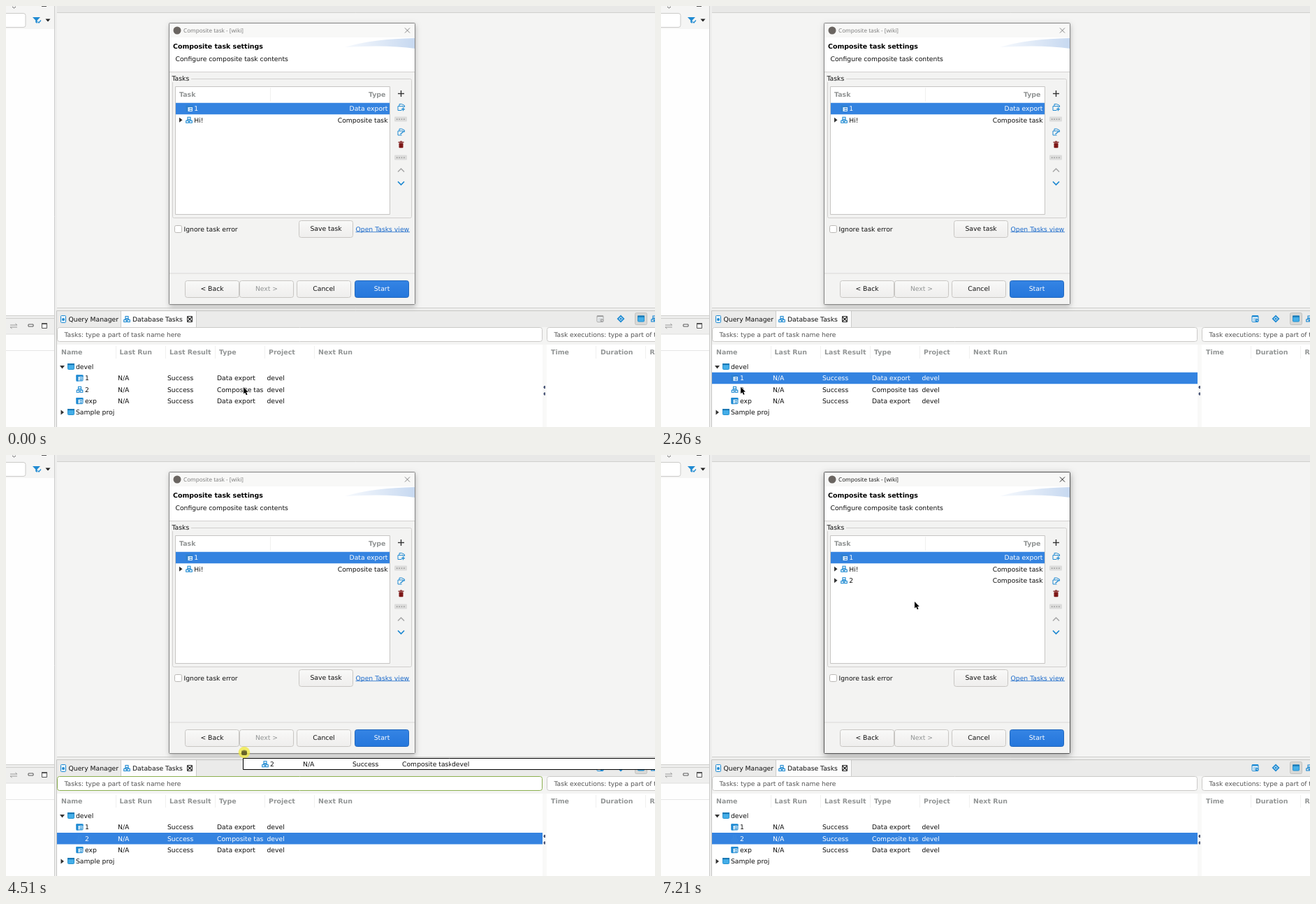
Animation, 929 px wide and 603 px high, one loop 8930 ms. Source, as an HTML page with a canvas:

```html
<!DOCTYPE html>
<html lang="en">
<head>
<meta charset="utf-8">
<title>Composite task settings</title>
<style>
html, body { margin: 0; width: 100%; height: 100%; overflow: hidden; background: #f4f4f3; }
canvas { display: block; }
</style>
</head>
<body>
<canvas id="stage" width="929" height="603"></canvas>
<script>
const c = document.getElementById('stage').getContext('2d');
const LOOP = 8930, STEP = 45;
const BLUE = '#1f8ad2', SEL = '#3483e0', GREY = '#929595', INK = '#111';
const UI = '"DejaVu Sans", sans-serif';

// Pointer path: time, x, y
const path = [
  [0, 340, 546], [30, 340, 546], [200, 290, 562], [400, 190, 572], [600, 120, 545],
  [710, 108, 531], [990, 108, 531], [1140, 110, 531], [1320, 110, 531], [1500, 146, 528],
  [1720, 146, 528], [1765, 142, 528], [2050, 122, 530], [2250, 114, 545], [2450, 116, 558],
  [2670, 127, 554], [2930, 116, 547], [4000, 116, 547], [4100, 172, 533], [4150, 176, 532],
  [4250, 235, 515], [4400, 318, 462], [4510, 341, 426], [4650, 340, 365], [4840, 316, 264],
  [4880, 314, 262], [5030, 303, 211], [6650, 303, 211], [7210, 363, 210], [LOOP, 363, 210]
];

const within = (t, a, b) => t >= a && t < b;

const stepped = t => Math.floor((t - 10) / STEP) * STEP + 10;

function pointerAt(t) {
  const i = Math.max(1, path.findIndex(p => p[0] > t));
  const [t0, x0, y0] = path[i - 1], [t1, x1, y1] = path[i];
  const k = (t - t0) / (t1 - t0);
  return [x0 + (x1 - x0) * k, y0 + (y1 - y0) * k];
}

function box(x, y, w, h, fill, stroke, r = 0) {
  c.beginPath();
  c.roundRect(x, y, w, h, r);
  if (fill) { c.fillStyle = fill; c.fill(); }
  if (stroke) { c.strokeStyle = stroke; c.lineWidth = 1; c.stroke(); }
}

function line(points, color, width = 1) {
  c.beginPath();
  points.forEach(([x, y]) => c.lineTo(x, y));
  c.strokeStyle = color;
  c.lineWidth = width;
  c.stroke();
}

function poly(points, fill) {
  c.beginPath();
  points.forEach(([x, y]) => c.lineTo(x, y));
  c.closePath();
  c.fillStyle = fill;
  c.fill();
}

function circle(x, y, r, fill) {
  c.beginPath();
  c.arc(x, y, r, 0, Math.PI * 2);
  c.fillStyle = fill;
  c.fill();
}

// y is the middle of the capitals
function text(s, x, y, color = INK, align = 'left', font = '9.25px ' + UI) {
  c.font = font;
  c.textAlign = align;
  c.fillStyle = color;
  c.fillText(s, x, y + 3.4);
}

const bold = (s, x, y, color = GREY, align = 'left') =>
  text(s, x, y, color, align, 'bold 9.45px ' + UI);

function clipped(s, x, y, w, color) {
  c.save();
  c.beginPath();
  c.rect(x - 1, y - 8, w + 1, 16);
  c.clip();
  text(s, x, y, color);
  c.restore();
}

// Icons, centred on x, y
function exportIcon(x, y, selected) {
  const col = selected ? '#2f80cf' : BLUE;
  box(x - 4.5, y - 4, 9, 8, selected ? '#e4f1fc' : '#e6f3fb', selected ? null : col, 1);
  box(x - 5, y - 4.5, 10, 2.5, col);
  box(x - 5, y - 4.5, 3, 9, col);
  box(x, y - .8, 3.5, 1.2, col);
  box(x, y + 1.8, 3.5, 1.2, col);
}

function groupIcon(x, y, color = BLUE) {
  c.strokeStyle = color;
  c.lineWidth = 1.1;
  c.strokeRect(x - 2, y - 4, 4, 3);
  c.strokeRect(x - 4.3, y + 1, 3.6, 3);
  c.strokeRect(x + .7, y + 1, 3.6, 3);
  line([[x - 2.7, y + 1], [x - 2.7, y - .5], [x + 2.7, y - .5], [x + 2.7, y + 1]], color);
}

function windowIcon(x, y) {
  box(x - 4.5, y - 4, 9, 8, '#45aee8', '#2391d0', 1);
  box(x - 5, y - 4.5, 10, 2.2, '#1878b4');
}

function editIcon(x, y, plus) {
  line([[x + 1, y + 4.5], [x - 4.5, y + 4.5], [x - 4.5, y - 1.5], [x + 3.5, y - 1.5], [x + 3.5, y]], BLUE);
  line([[x - 2.5, y - 1.5], [x - 2.5, y - 4.5], [x + 1, y - 4.5], [x + 5, y - 2.5], [x + 5, y]], BLUE);
  if (plus) {
    line([[x + .5, y + 2.8], [x + 5.5, y + 2.8]], BLUE, 1.3);
    line([[x + 3, y + .3], [x + 3, y + 5.3]], BLUE, 1.3);
  } else line([[x - 1, y + 3], [x + 4, y - 1]], BLUE, 1.5);
}

function clockIcon(x, y, color) {
  box(x - 4.5, y - 4.5, 9, 9, '#f6fafc', color, 1);
  box(x - 4.5, y - 4.5, 9, 2, color);
  line([[x - 3, y], [x + 3, y]], color, .8);
  line([[x - 3, y + 2.2], [x, y + 2.2]], color, .8);
  circle(x + 2.5, y + 2.5, 2.4, color);
  line([[x + 2.5, y + 1], [x + 2.5, y + 2.8], [x + 4, y + 2.8]], '#fff', .7);
}

function pill(y) {
  box(556, y - 3.5, 18, 7, '#dcdcdb', null, 1);
  for (let i = 0; i < 4; i++) box(559 + i * 3.4, y - .5, 1.4, 1.4, '#929292');
}

const right = (x, y) => poly([[x - 2, y - 3.5], [x + 2.5, y], [x - 2, y + 3.5]], '#333');
const down = (x, y) => poly([[x - 3.5, y - 2], [x + 3.5, y - 2], [x, y + 2.5]], '#333');

function leftSide() {
  box(0, 0, 70, 443, '#f5f5f4');
  box(0, 33, 70, 410, '#fefefe');
  box(-5, 10.5, 33, 20, '#fff', '#cbcac8', 3);
  line([[9, 1], [11.5, 3], [14, 1]], '#666');
  line([[51, .5], [58, .5]], '#555');
  poly([[38, 16], [49, 16], [44.7, 20.5], [44.7, 25], [42.3, 23.5], [42.3, 20.5]], BLUE);
  line([[45.5, 22.5], [47, 24], [50, 20.5]], BLUE, 1.2);
  poly([[56.5, 18.5], [63.5, 18.5], [60, 22.5]], '#222');
  line([[0, 443.5], [70, 443.5]], '#cfcfcd');
  box(0, 444, 70, 4, '#eeeeed');
  box(0, 447, 70, 156, '#fefefe');
  box(0, 447, 70, 23, '#efefee');
  line([[0, 447.5], [70, 447.5]], '#cfcfcd');
  line([[0, 470], [70, 470]], '#dededc');
  line([[0, 493.5], [70, 493.5]], '#e6e6e5');
  line([[6, 457], [16, 457], [13.5, 455]], '#9a9a9a');
  line([[16, 460], [6, 460], [8.5, 462]], '#9a9a9a');
  box(32, 456, 7, 3, '#fff', '#555');
  box(51.5, 454.5, 7, 7, '#fff', '#555');
  box(51, 454, 8, 2, '#555');
  line([[69.5, 0], [69.5, 603]], '#cccccb');
  box(70, 0, 3, 603, '#eeeeed');
}

function tableRow(y, name, type, icon, selected) {
  if (selected) box(73, y - 8.2, 695, 16.4, SEL);
  const col = selected ? '#fff' : INK;
  if (icon === 'group') groupIcon(105.5, y, selected ? '#3a88e0' : BLUE);
  else exportIcon(105.5, y, selected);
  text(name, 113, y, col);
  text('N/A', 160, y, col);
  text('Success', 231, y, col);
  clipped(type, 302, y, 67, col);
  text('devel', 373.5, y, col);
}

function bottomPanel(t) {
  const live = t >= 1320;
  box(73, 437, 856, 166, '#fff');
  box(73, 437, 856, 23, '#ebebea');
  line([[929, 436.5], [72.5, 436.5], [72.5, 603]], '#c6c6c4');
  box(165, 437, 107, 24, '#fcfcfc');
  line([[164.5, 437], [164.5, 460]], '#cdcdcb');
  line([[272.5, 437], [272.5, 460]], '#cdcdcb');
  box(78.5, 443.5, 7, 10, '#e9f5fb', BLUE, 1);
  circle(82, 449, 2, BLUE);
  text('Query Manager', 89.5, 448.5);
  groupIcon(173, 448.5);
  text('Database Tasks', 181, 448.5);
  box(259.5, 444.5, 7, 8, '#fff', '#333');
  line([[260, 445.5], [266, 451.5]], '#222', 1.3);
  line([[266, 445.5], [260, 451.5]], '#222', 1.3);

  clockIcon(850.5, 448, live ? BLUE : '#a4a4a4');
  poly([[880, 442.5], [885.5, 448], [880, 453.5], [874.5, 448]], BLUE);
  poly([[880, 445], [883, 448], [880, 451], [877, 448]], '#d8edf8');
  circle(880, 448, 1.5, BLUE);
  box(900.5, 439.5, 17, 17, '#d8d8d6', '#c2c2c0', 2);
  windowIcon(909, 448);
  groupIcon(928, 448);

  box(73, 460, 856, 25, '#f4f4f3');
  const over = within(t, 4350, 4560);
  box(73.5, 460.5, 694, 20, '#fff', over ? '#8bb04f' : '#cbcac8', 3);
  box(774.5, 460.5, 170, 20, '#fff', '#cbcac8', 3);
  const hint = '9.15px ' + UI;
  text('Tasks: type a part of task name here', 83.5, 470.5, '#555', 'left', hint);
  text('Task executions: type a part of task name', 784.5, 470.5, '#555', 'left', hint);

  box(768, 485, 6, 118, '#f9f9f8');
  const heads = [['Name', 79], ['Last Run', 162.5], ['Last Result', 234], ['Type', 305],
    ['Project', 376], ['Next Run', 447], ['Time', 780], ['Duration', 851], ['Result', 921.5]];
  heads.forEach(([s, x]) => bold(s, x, 496));
  for (const x of [157.5, 228.5, 299.5, 370.5, 441.5, 844.5, 915.5])
    line([[x, 487], [x, 505]], '#f0f0ef');

  down(80.5, 517);
  windowIcon(93, 516.5);
  text('devel', 100, 516.5);
  tableRow(533, '1', 'Data export', 'export', within(t, 1320, 4000));
  tableRow(549.3, '2', 'Composite task', 'group', t >= 4000);
  tableRow(565.7, 'exp', 'Data export', 'export', false);
  right(80.5, 582);
  windowIcon(93, 581.5);
  text('Sample proj', 100, 582);
  for (const y of [546, 555.5]) {
    box(770, y - 2, 2, 4, '#4d5878');
    box(769, y - 1, 1, 2, '#9aa3ba');
  }
}

function button(label, x, w, y, state) {
  const primary = state === 'primary';
  const fill = c.createLinearGradient(0, y, 0, y + 24);
  fill.addColorStop(0, primary ? '#3584e4' : '#f9f9f8');
  fill.addColorStop(1, primary ? '#2577dc' : '#efeeed');
  box(x + .5, y + .5, w - 1, 24, fill, primary ? '#2268bd' : '#c8c6c3', 3);
  text(label, x + w / 2, y + 12, primary ? '#fff' : state === 'off' ? '#929595' : INK, 'center');
}

function dialogRow(y, name, type, icon, selected) {
  if (selected) box(243, y - 8.2, 306, 16.4, SEL);
  const col = selected ? '#fff' : INK;
  if (icon === 'group') {
    right(250, y);
    groupIcon(262, y);
  } else exportIcon(262.5, y, true);
  text(name, 269.3, y, col);
  text(type, 546.5, y, col, 'right');
}

function dialog(active) {
  c.save();
  c.shadowColor = active ? 'rgba(0,0,0,.38)' : 'rgba(0,0,0,.28)';
  c.shadowBlur = active ? 9 : 7;
  c.shadowOffsetY = 2;
  box(234, 25, 352, 403, '#f3f3f2');
  c.restore();
  box(234, 25, 352, 69, '#fff');
  box(234, 25, 352, 20, '#f8f8f7');

  // header swoosh
  const g = c.createLinearGradient(485, 0, 586, 0);
  g.addColorStop(0, 'rgba(200,218,242,.15)');
  g.addColorStop(1, '#c6d8f0');
  c.fillStyle = g;
  c.beginPath();
  c.moveTo(485, 59);
  c.quadraticCurveTo(525, 47, 586, 46);
  c.lineTo(586, 61);
  c.quadraticCurveTo(545, 55, 485, 59);
  c.fill();

  box(233.5, 24.5, 352, 403, null, active ? '#555' : '#858585', 1);
  circle(245, 35, 5.5, '#6a6561');
  text('Composite task - [wiki]', 254, 35, active ? '#222' : '#808080', 'left',
    '8.15px "Noto Sans", sans-serif');
  const cross = active ? '#222' : '#858585';
  line([[571, 31.5], [578, 38.5]], cross);
  line([[578, 31.5], [571, 38.5]], cross);

  bold('Composite task settings', 239, 58, '#000');
  text('Configure composite task contents', 242.5, 76);
  line([[234, 94.5], [585, 94.5]], '#d2d1cf');

  box(238.5, 104.5, 342, 199, null, '#d0cfcd', 2);
  box(237, 100, 28, 9, '#f3f3f2');
  text('Tasks', 237.5, 104);
  box(242.5, 115.5, 307, 183, '#fff', '#c6c5c3');
  bold('Task', 248, 126.5);
  bold('Type', 543.5, 126.5, GREY, 'right');
  line([[378.5, 117], [378.5, 137]], '#f0f0ef');
  dialogRow(147, '1', 'Data export', 'export', true);
  dialogRow(163.3, 'Hi!', 'Composite task', 'group');
  if (active) dialogRow(179.7, '2', 'Composite task', 'group');

  line([[561, 125.5], [570, 125.5]], '#333', 1.4);
  line([[565.5, 121], [565.5, 130]], '#333', 1.4);
  editIcon(565.5, 145, true);
  pill(162);
  editIcon(565.5, 180.5, false);
  box(562.5, 196.2, 6, 7, '#7d1717', null, 1);
  box(561.5, 194.5, 8, 1.3, '#7d1717');
  box(564, 193.5, 3, 1.2, '#7d1717');
  pill(217);
  line([[561, 237.5], [565.5, 233], [570, 237.5]], '#a6a6a6', 1.5);
  line([[561, 251.5], [565.5, 256], [570, 251.5]], '#1a86d0', 1.7);

  box(241.5, 314.5, 10, 10, '#fff', '#bab8b5', 2);
  text('Ignore task error', 254.5, 319.2);
  button('Save task', 419, 78, 307);
  text('Open Tasks view', 500.5, 319.2, '#1b6acb');
  line([[500.5, 323.7], [578, 323.7]], '#1b6acb', .8);
  line([[234, 383], [585, 383]], '#d9d8d6');
  button('< Back', 256, 78, 393);
  button('Next >', 334, 78, 393, 'off');
  button('Cancel', 416, 78, 393);
  button('Start', 499, 78, 393, 'primary');
}

// The dragged row trails slightly behind the hand
function dragRow(t, first) {
  const [px, py] = pointerAt(t - 20);
  const x = Math.round(px + 2.5), y = Math.round(py + 1), mid = y + 8.7;
  box(x + .5, y + .5, 717, 16, '#fff', '#000');
  if (first) exportIcon(x + 32, mid);
  else groupIcon(x + 32, mid);
  text(first ? '1' : '2', x + 39, mid);
  text('N/A', x + 86, mid);
  text('Success', x + 157, mid);
  clipped(first ? 'Data export' : 'Composite task', x + 228, mid, 70);
  text('devel', x + 299, mid);
}

function hand(x, y) {
  box(x - 4, y - 1.5, 8, 5.5, '#66622a', null, 2);
  for (let i = 0; i < 4; i++)
    box(x - 3.6 + i * 1.9, y - (i % 3 ? 3.6 : 2.8), 1.5, 4, '#66622a', null, .7);
}

function arrow(x, y) {
  c.save();
  c.translate(x, y);
  const shape = [[0, 0], [0, 9.6], [2.2, 7.6], [3.8, 11.2], [5.5, 10.5], [3.9, 7], [6.8, 6.9]];
  line([...shape, shape[0]], 'rgba(255,255,255,.85)', 1.4);
  poly(shape, '#000');
  c.restore();
}

function draw(t) {
  c.textRendering = 'geometricPrecision';
  c.textBaseline = 'alphabetic';
  box(0, 0, 929, 603, '#eeeeed');
  box(73, 0, 856, 10, '#e8e8e7');
  box(73, 10, 856, 423, '#f4f4f3');
  line([[929, 9.5], [72.5, 9.5], [72.5, 432.5], [929, 432.5]], '#cfcfcd');
  leftSide();
  bottomPanel(t);
  dialog(t >= 6650);

  const dragging = within(t, 1320, 2050) || within(t, 4000, 5260);
  const pressed = dragging || within(t, 990, 1320) || within(t, 3820, 4000);
  const now = stepped(t);
  const [x, y] = pointerAt(now);
  if (dragging) dragRow(now, t < 4000);
  if (pressed) circle(x, y, 8.3, 'rgba(240,234,60,.75)');
  if (dragging) hand(x, y);
  else arrow(x, y);
}

function tick() {
  draw(performance.now() % LOOP);
  requestAnimationFrame(tick);
}
tick();
</script>
</body>
</html>
```
